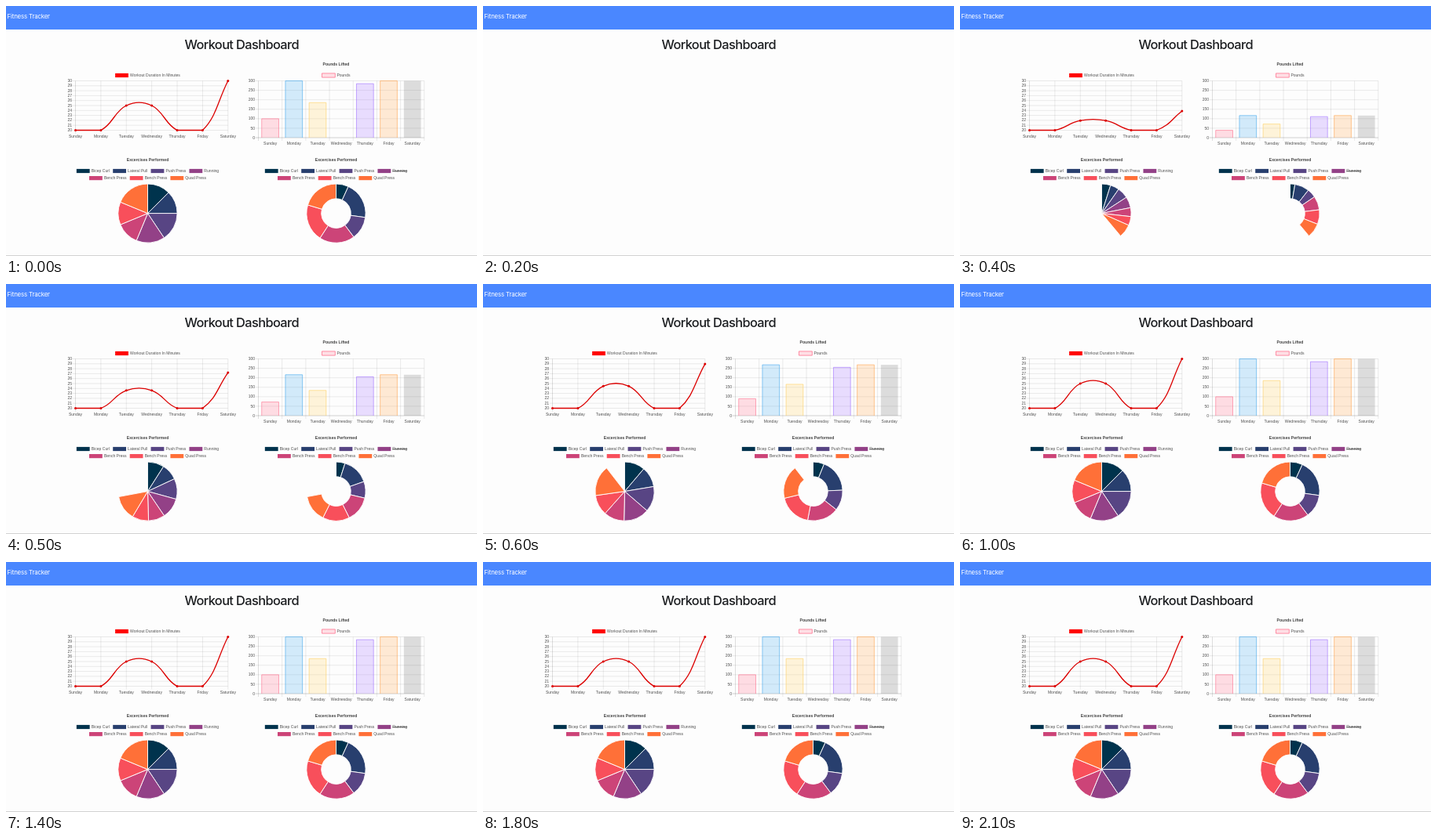
Animation, 600 px wide and 319 px high, one loop 2200 ms. Source, as an HTML page with a canvas:

```html
<!DOCTYPE html>
<html lang="en">
<head>
<meta charset="utf-8">
<title>Workout Dashboard</title>
<style>
  html, body { margin: 0; width: 100%; height: 100%; overflow: hidden; background: #fdfdfd; }
  canvas { display: block; width: 600px; height: 319px; }
</style>
</head>
<body>
<canvas id="stage"></canvas>
<script>
const W = 600, H = 319, LOOP = 2200, TAU = Math.PI * 2;
const BG = '#fdfdfd', INK = '#505050';
const SANS = '"Liberation Sans", Arial, sans-serif';
const UI = 'Inter, Roboto, sans-serif';
const DAYS = ['Sunday', 'Monday', 'Tuesday', 'Wednesday', 'Thursday', 'Friday', 'Saturday'];
const MINUTES = [20, 20, 25, 25, 20, 20, 30];
const POUNDS = [100, 300, 185, 0, 285, 300, 300];
const BAR_RGB = ['255,99,132', '54,162,235', '255,206,86', '75,192,192', '153,102,255', '255,159,64'];
const EXERCISES = ['Bicep Curl', 'Lateral Pull', 'Push Press', 'Running', 'Bench Press', 'Bench Press', 'Quad Press'];
const SLICES = ['#00334d', '#283f6e', '#584584', '#934187', '#cc4478', '#f84f5b', '#ff7038'];

const canvas = document.getElementById('stage');
const ctx = canvas.getContext('2d');
const dpr = window.devicePixelRatio || 1;
canvas.width = W * dpr;
canvas.height = H * dpr;
ctx.scale(dpr, dpr);

function text(str, x, y, { font = `5.05px ${SANS}`, color = INK, align = 'center', base = 'middle', gap = 0 } = {}) {
  ctx.font = font;
  ctx.fillStyle = color;
  ctx.textAlign = align;
  ctx.textBaseline = base;
  ctx.letterSpacing = gap + 'px';
  ctx.fillText(str, x, y);
  ctx.letterSpacing = '0px';
}

function title(str, x, y) {
  text(str, x, y, { font: `bold 5.1px ${SANS}`, color: '#444' });
}

function line(x1, y1, x2, y2, alpha = 0.09) {
  ctx.strokeStyle = `rgba(0,0,0,${alpha})`;
  ctx.lineWidth = 0.9;
  ctx.beginPath();
  ctx.moveTo(x1, y1);
  ctx.lineTo(x2, y2);
  ctx.stroke();
}

// One centred legend row; items are { label, fill, stroke, off }
function legend(items, cx, y) {
  const box = 16.8, pad = 2.1, gap = 4.2;
  ctx.font = `5.05px ${SANS}`;
  const widths = items.map(it => ctx.measureText(it.label).width);
  const total = widths.reduce((sum, w) => sum + box + pad + w, gap * (items.length - 1));
  let x = cx - total / 2;
  items.forEach((it, i) => {
    ctx.fillStyle = it.fill;
    ctx.fillRect(x, y - 2.6, box, 5.2);
    if (it.stroke) {
      ctx.strokeStyle = it.stroke;
      ctx.lineWidth = 0.7;
      ctx.strokeRect(x, y - 2.6, box, 5.2);
    }
    const tx = x + box + pad;
    text(it.label, tx, y + 0.2, { align: 'left' });
    if (it.off) {
      ctx.fillStyle = INK;
      ctx.fillRect(tx, y - 0.2, widths[i], 0.8);
    }
    x = tx + widths[i] + gap;
  });
}

function grid({ left, right, top, bottom, min, max, step, cols, zero }) {
  const rows = (max - min) / step;
  for (let i = 0; i <= rows; i++) {
    const y = bottom - (bottom - top) * i / rows;
    line(left - 4, y, right, y, i === 0 && zero ? 0.2 : 0.09);
    text(min + i * step, left - 4.4, y + 0.2, { align: 'right' });
  }
  for (let i = 0; i <= cols; i++) {
    const x = left + (right - left) * i / cols;
    line(x, top, x, bottom + 4, i ? 0.09 : 0.14);
  }
}

// Handles of a smooth curve through three neighbours
function handles(prev, p, next, area) {
  const a = Math.hypot(p.x - prev.x, p.y - prev.y);
  const b = Math.hypot(next.x - p.x, next.y - p.y);
  const k = 0.4 / (a + b);
  const dx = next.x - prev.x, dy = next.y - prev.y;
  const cap = y => Math.min(area.bottom, Math.max(area.top, y));
  return {
    x0: p.x - k * a * dx, y0: cap(p.y - k * a * dy),
    x1: p.x + k * b * dx, y1: cap(p.y + k * b * dy)
  };
}

function lineChart(e) {
  const area = { left: 88.5, right: 282.8, top: 95.5, bottom: 158.5, min: 20, max: 30, step: 1, cols: 6 };
  legend([{ label: 'Workout Duration In Minutes', fill: '#f00' }], 180.5, 88.5);
  grid(area);
  const pts = MINUTES.map((v, i) => ({
    x: area.left + (area.right - area.left) * i / 6,
    y: area.bottom - (area.bottom - area.top) * (v - 20) / 10
  }));
  const hs = pts.map((p, i) => handles(pts[i - 1] || p, p, pts[i + 1] || p, area));
  const rise = y => area.bottom + (y - area.bottom) * e;

  ctx.strokeStyle = ctx.fillStyle = '#dc0000';
  ctx.lineWidth = 1.3;
  ctx.beginPath();
  ctx.moveTo(pts[0].x, rise(pts[0].y));
  for (let i = 1; i < pts.length; i++) {
    const a = hs[i - 1], b = hs[i], p = pts[i];
    ctx.bezierCurveTo(a.x1, rise(a.y1), b.x0, rise(b.y0), p.x, rise(p.y));
  }
  ctx.stroke();
  for (const p of pts) {
    ctx.beginPath();
    ctx.arc(p.x, rise(p.y), 1.5, 0, TAU);
    ctx.fill();
  }
  pts.forEach((p, i) => text(DAYS[i], p.x, 166.2));
}

function barChart(e) {
  const area = { left: 321.5, right: 532.8, top: 95.5, bottom: 168, min: 0, max: 300, step: 50, cols: 7, zero: true };
  const pink = `rgb(${BAR_RGB[0]})`;
  title('Pounds Lifted', 420.5, 74.6);
  legend([{ label: 'Pounds', fill: `rgba(${BAR_RGB[0]},0.2)`, stroke: pink }], 420.5, 88.5);
  grid(area);
  const col = (area.right - area.left) / 7, bw = col * 0.72;
  POUNDS.forEach((v, i) => {
    const cx = area.left + col * (i + 0.5), x = cx - bw / 2;
    const top = area.bottom - (area.bottom - area.top) * v / 300 * e;
    const rgb = BAR_RGB[i];
    ctx.fillStyle = rgb ? `rgba(${rgb},0.22)` : 'rgba(0,0,0,0.13)';
    ctx.fillRect(x, top, bw, area.bottom - top);
    if (rgb && v) {
      ctx.strokeStyle = `rgb(${rgb})`;
      ctx.lineWidth = 0.55;
      ctx.beginPath();
      ctx.moveTo(x, area.bottom);
      ctx.lineTo(x, top);
      ctx.lineTo(x + bw, top);
      ctx.lineTo(x + bw, area.bottom);
      ctx.stroke();
    }
    text(DAYS[i], cx, 175.6);
  });
}

function pieChart(cx, data, inner, e) {
  const cy = 264.6, outer = 37.6;
  const items = EXERCISES.map((label, i) => ({ label, fill: SLICES[i], off: !data[i] }));
  title('Excercises Performed', cx, 196.6);
  legend(items.slice(0, 4), cx, 210.5);
  legend(items.slice(4), cx, 219.6);
  const sum = data.reduce((a, b) => a + b);
  let from = -TAU / 4;
  data.forEach((v, i) => {
    if (!v) return;
    const to = from + TAU * v / sum * e;
    ctx.beginPath();
    ctx.arc(cx, cy, outer, from, to);
    ctx.arc(cx, cy, inner, to, from, true);
    ctx.closePath();
    ctx.fillStyle = SLICES[i];
    ctx.fill();
    ctx.strokeStyle = '#fff';
    ctx.lineWidth = 0.9;
    ctx.lineJoin = 'bevel';
    ctx.stroke();
    from = to;
  });
}

// Chart growth: hidden after the reload, then an ease-out quart
function growth(ms) {
  if (ms < 100) return 1;
  if (ms < 400) return 0;
  const t = ms < 600 ? 0.116 + (ms - 400) * 0.00157 : 0.431 + (ms - 600) * 0.0011;
  return 1 - Math.pow(1 - Math.min(1, t), 4);
}

function draw(ms) {
  ctx.fillStyle = BG;
  ctx.fillRect(0, 0, W, H);
  ctx.fillStyle = '#4a87ff';
  ctx.fillRect(0, 0, W, 30);
  ctx.fillStyle = '#d2d2d2';
  ctx.fillRect(0, 318, W, 1);
  text('Fitness Tracker', 1.6, 16, { font: `400 7.9px ${UI}`, color: '#fff', align: 'left', base: 'alphabetic', gap: -0.2 });
  text('Workout Dashboard', 300.2, 55, { font: `500 16.4px ${UI}`, color: '#1c1e21', base: 'alphabetic', gap: -0.62 });

  const e = growth(ms);
  if (!e) return;
  lineChart(e);
  barChart(e);
  pieChart(180.5, MINUTES, 0, e);
  pieChart(420.5, POUNDS, 18.8, e);
}

const start = performance.now();
function tick() {
  const ms = (performance.now() - start) % LOOP;
  draw(Math.floor(ms / 100) * 100);
  requestAnimationFrame(tick);
}
tick();
</script>
</body>
</html>
```
